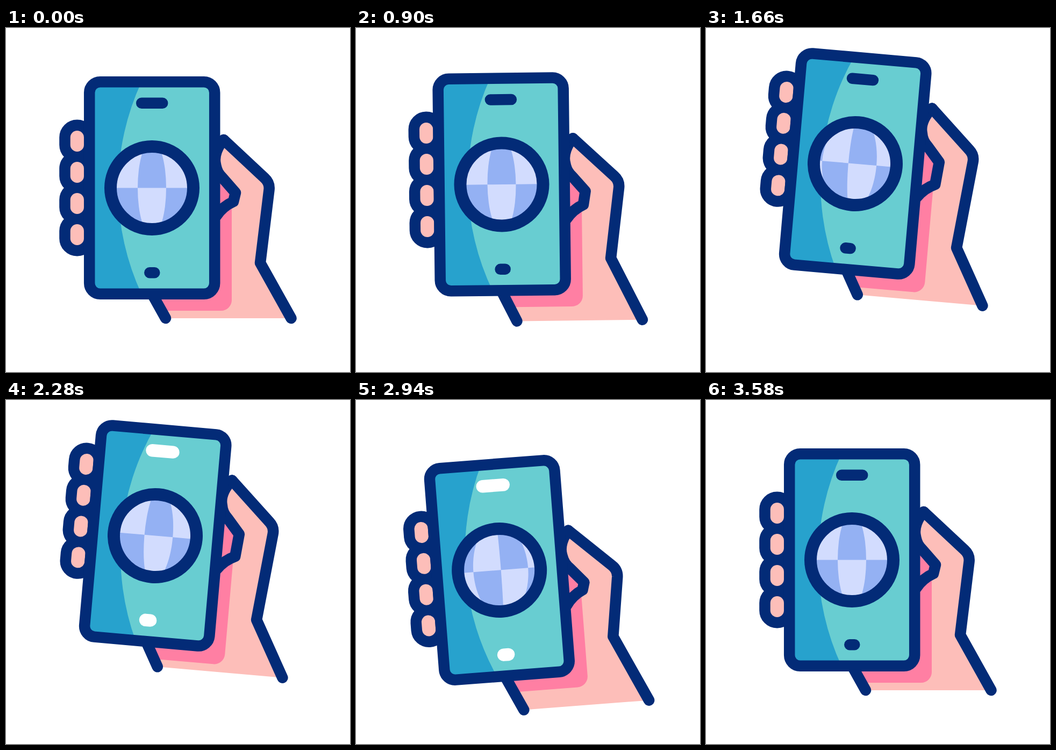
Animation of 640 by 640 pixels, one loop 3600 ms. Source, as an HTML page:

```html
<!DOCTYPE html>
<html lang="en">
<head>
<meta charset="utf-8">
<title>Phone in hand</title>
<style>
  html, body { margin: 0; width: 100%; height: 100%; overflow: hidden; background: #fff; }
  svg { display: block; width: 100vw; height: 100vh; }
  .line { fill: none; stroke: #032b77; stroke-width: 20.5; stroke-linecap: round; stroke-linejoin: round; }
  .rim { stroke: #032b77; stroke-width: 41; }
  .skin { fill: #fdbeb9; }
</style>
</head>
<body>
<svg viewBox="0 0 640 640">
  <defs>
    <clipPath id="disc"><circle r="67"/></clipPath>
    <clipPath id="screen"><rect x="155.2" y="100.2" width="233" height="394.6" rx="20"/></clipPath>
  </defs>
  <g id="scene">
    <path id="arm" class="skin"/>
    <path id="palm" fill="#ff7fa3"/>
    <path id="web" class="line"/>
    <path id="edge" class="line"/>
    <path id="wrist" class="line"/>
    <g id="fingers"></g>
    <g clip-path="url(#screen)">
      <rect x="150" y="95" width="245" height="405" fill="#68cdd1"/>
      <path d="M150 95H254.5A470 470 0 0 0 254.5 500H150Z" fill="#27a2cd"/>
    </g>
    <rect class="line" x="155.2" y="100.2" width="233" height="394.6" rx="20"/>
    <path id="pills" class="line" d="M252.2 139.8H291.2M267.3 455.3H276.3"/>
    <g transform="translate(271.5 297.5)">
      <g clip-path="url(#disc)">
        <circle r="68" fill="#d2dcfe"/>
        <path id="cells" fill="#94b1f3"/>
      </g>
      <circle class="line" r="77" style="stroke-width:23"/>
    </g>
  </g>
</svg>
<script>
const LOOP = 3600;
const $ = id => document.getElementById(id);
const set = (id, name, value) => $(id).setAttribute(name, value);

// x, y offset, tilt, wrist stretch, thumb slide, finger slide
const rest = [0, 0, 0, 0, 0, 0];
const down = [-5.5, 23, -5, 21.6, 29, 8.6];
const up = [6, -45, 5, 0, -25.5, -34.3];
const keys = [
  [0, rest], [400, down], [600, down], [1260, up],
  [2600, up], [3000, down], [3480, rest], [LOOP, rest]
];

const ease = p => p * p * (3 - 2 * p);
const clamp = (v, lo, hi) => Math.min(hi, Math.max(lo, v));

function poseAt(t) {
  let i = 0;
  while (i < keys.length - 2 && t >= keys[i + 1][0]) i++;
  const [t0, a] = keys[i], [t1, b] = keys[i + 1];
  const p = ease(clamp((t - t0) / (t1 - t0), 0, 1));
  return a.map((v, n) => v + (b[n] - v) * p);
}

function buildFingers() {
  const pill = (y, cls) =>
    `<rect x="119.7" y="${y - 19.5}" width="25.3" height="39" rx="12.6" class="${cls}"/>`;
  const rows = [210.5, 268.5, 326.5, 384.5];
  $('fingers').innerHTML =
    rows.map(y => pill(y, 'rim')).join('') + rows.map(y => pill(y, 'skin')).join('');
}

function drawHand(stretch, slide) {
  const y = v => v + slide;
  const low = v => v + stretch * 1.14;
  const end = 540 + stretch;
  const outline = `M405 ${y(208)}L481 ${y(279)}Q491 ${y(288)} 489.5 ${y(301)}L473 437L530.5 ${end}`;
  const thumb = `M405 ${y(208)}C394 ${y(220)} 386 ${y(238)} 390 ${y(254)}` +
    `C392 ${y(266)} 396 ${y(272)} 403 ${y(279)}L427 ${y(306.5)}`;
  set('edge', 'd', outline);
  set('web', 'd', `${thumb}L423 ${low(323)}Q403 ${low(332)} 391 ${low(350)}`);
  set('wrist', 'd', `M239.5 437L297 ${end}`);
  set('arm', 'd', `${outline}H297L239.5 437H380V${y(250)}H390Z`);
  set('palm', 'd', `M380 ${y(262)}L424 ${y(307)}L420 ${low(324)}V506a20 20 0 0 1 -20 20H289L239.5 437H380Z`);
}

// One quarter cell between two meridians, above (-1) or below (1) the equator
function cell(a, b, side) {
  const pole = 88 * side;
  const turn = x => (x < 0) === (side < 0) ? 1 : 0;
  return `M${a} 0A${Math.abs(a)} 88 0 0 ${turn(a)} 0 ${pole}` +
    `A${Math.abs(b)} 88 0 0 ${1 - turn(b)} ${b} 0Z`;
}

function drawGlobe(spin) {
  const mid = Math.round(spin);
  const x = c => (100 * Math.sin(clamp((c - spin) * 0.536, -1.5, 1.5))).toFixed(2);
  let d = '';
  for (let c = mid - 2; c <= mid + 2; c++) {
    d += cell(+x(c - 0.5), +x(c + 0.5), c % 2 ? 1 : -1);
  }
  set('cells', 'd', d);
}

function render(t) {
  const [dx, dy, tilt, stretch, slide, grip] = poseAt(t);
  set('scene', 'transform', `translate(${dx} ${dy}) rotate(${tilt} 271.5 297.5)`);
  set('fingers', 'transform', `translate(0 ${grip})`);
  drawHand(stretch, slide);
  drawGlobe(6 * Math.sin(clamp((t - 1215) / 2385, 0, 1) * Math.PI / 2));
  const lit = t >= 1800 && t < 3000;
  $('pills').style.stroke = lit ? '#fff' : '';
  $('pills').style.strokeWidth = lit ? 23.5 : '';
}

const start = performance.now();
function tick() {
  render((performance.now() - start) % LOOP);
  requestAnimationFrame(tick);
}
buildFingers();
render(0);
requestAnimationFrame(tick);
</script>
</body>
</html>
```
